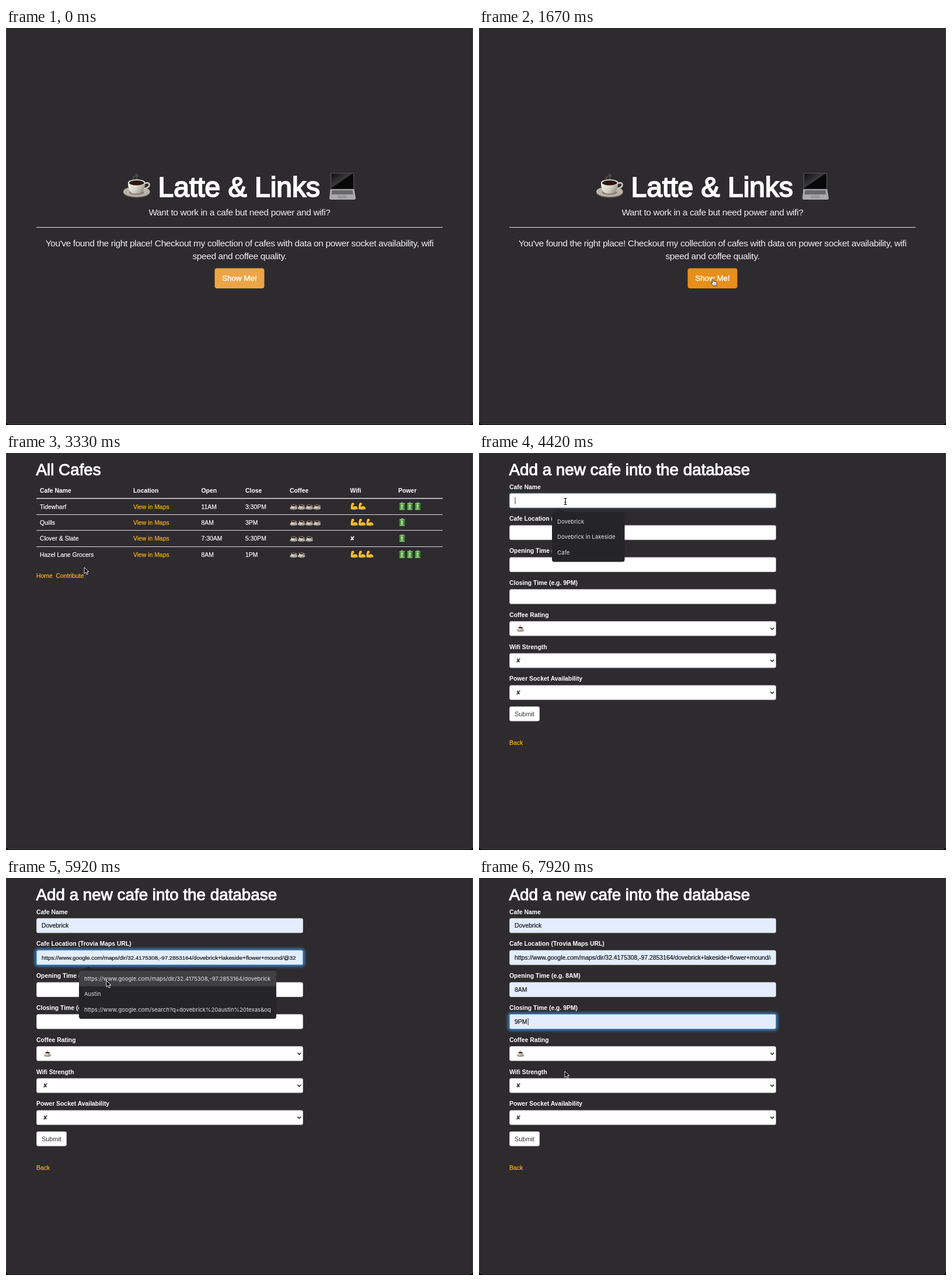
These frames come from a looping animation (800x680 px, 8000 ms). An HTML page:

```html
<!DOCTYPE html>
<html lang="en">
<head>
<meta charset="utf-8">
<title>Cafe finder</title>
<style>
  html, body { margin: 0; width: 100%; height: 100%; overflow: hidden; background: #000; }
  svg { display: block; }
  text { font: 10.4px "Liberation Sans", Arial, sans-serif; fill: #fff; stroke: #fff; stroke-width: .2px; white-space: pre; }
  .bold { font-weight: 700; stroke: none; }
  .title { font-size: 27.8px; stroke-width: 1px; }
  .hero { font-size: 48px; stroke-width: 2px; }
  .lead { font-size: 15.5px; letter-spacing: -.39px; fill: #f0f0f0; stroke: none; text-anchor: middle; }
  .button { font-size: 13.4px; stroke-width: .4px; text-anchor: middle; }
  .link { fill: #ffb50f; stroke: #ffb50f; }
  .value { fill: #111; stroke: #111; }
  .preview { fill: #111; stroke: #111; font-size: 9.85px; }
  .mark { font-family: "DejaVu Sans", sans-serif; stroke: none; }
  .dark { fill: #333; stroke: none; }
  .option { font: 9.6px Inter, Roboto, sans-serif; fill: #e2e2e2; stroke: none; }
  .box { fill: #fff; stroke: #ccc; }
</style>
</head>
<body>
<svg width="800" height="680" viewBox="0 0 800 680">
  <defs>
    <linearGradient id="china" x2="1" y2=".4">
      <stop stop-color="#efede7"/><stop offset=".6" stop-color="#d6d2c8"/><stop offset="1" stop-color="#9d988e"/>
    </linearGradient>
    <linearGradient id="screen" x2="1" y2="1">
      <stop stop-color="#0c0c0c"/><stop offset=".45" stop-color="#3a3a3c"/><stop offset=".5" stop-color="#080808"/>
    </linearGradient>
    <linearGradient id="cell" x2="1">
      <stop stop-color="#2c6b25"/><stop offset=".4" stop-color="#7fc765"/><stop offset="1" stop-color="#245c20"/>
    </linearGradient>
    <filter id="glow" x="-5%" y="-60%" width="110%" height="220%"><feGaussianBlur stdDeviation="2.2"/></filter>
    <symbol id="cup" viewBox="0 0 48 48">
      <path d="M20 13q-5-4 1-6t1-4M25 13q-3-4 2-8" fill="none" stroke="#55504f" stroke-width="2.4" opacity=".75"/>
      <ellipse cx="24" cy="35" rx="23" ry="9" fill="#7d786f"/>
      <ellipse cx="24" cy="33.5" rx="23" ry="8.700" fill="#bab5aa"/>
      <ellipse cx="24" cy="35" rx="13" ry="4.500" fill="#878177"/>
      <path d="M38 19q8-2 8 3t-11 7" fill="none" stroke="#cfcbc1" stroke-width="2.600"/>
      <path d="M9 18q0 17 10 19h9q10-2 11-19z" fill="url(#china)"/>
      <ellipse cx="24" cy="18" rx="15" ry="5.500" fill="#e9e6df"/>
      <ellipse cx="24" cy="18.500" rx="13" ry="4.300" fill="#2b170d"/>
    </symbol>
    <symbol id="arm" viewBox="0 0 26 26">
      <path d="M4 3q4-3 8 0l1 4-4 3 1 5q7-5 13 1 3 5 1 7-10 3-22 0-2-8 2-20z" fill="#fcc436"/>
      <path d="M8 9l-1 7 5 2M12 21q6 2 11-1" fill="none" stroke="#c88714" stroke-width="1.6"/>
    </symbol>
    <symbol id="battery" viewBox="0 0 26 26">
      <rect x="9" y="0" width="8" height="3" fill="#aaa"/>
      <rect x="3" y="2" width="20" height="24" rx="3" fill="url(#cell)"/>
      <path d="M4 4h18M4 24h18" stroke="#9fae9a" stroke-width="2"/>
      <path d="M13 8v7M9.500 11.500h7M10 19h6" stroke="#dff0d6" stroke-width="1.800"/>
    </symbol>
  </defs>
  <rect x=".5" y="-10" width="799" height="688.5" rx="5" fill="#2d2b2e" stroke="#444246"/>
  <g id="scenes"></g>
  <g id="live"></g>
</svg>
<script>
const LOOP = 8000, STEP = 1000 / 12;
const TABLE_AT = 2000, FORM_AT = 3740;

const text = (x, y, s, cls = '') => `<text x="${x}" y="${y}" class="${cls}">${s}</text>`;
const icon = (id, x, y, size) => `<use href="#${id}" x="${x}" y="${y}" width="${size}" height="${size}"/>`;
const rect = (x, y, w, h, attrs) => `<rect x="${x}" y="${y}" width="${w}" height="${h}" ${attrs}/>`;
const icons = (id, count, x, y) =>
  Array.from({ length: count }, (_, i) => icon(id, x + i * 13.35, y, 13.3)).join('');

function homeScene() {
  return icon('cup', 200, 247, 47.5) + text(260.5, 289, 'Latte &amp; Links', 'hero') +
    `<path d="M557 248h38q1.500 0 1.500 2v26h-41v-26q0-2 1.500-2z" fill="#48484a"/>
     <path d="M557.500 249.500h37.500v26H557z" fill="url(#screen)"/>
     <path d="M555.500 276h41l2.500 15q0 3-2 3h-41q-2 0-2-3z" fill="#a9a9ab"/>
     <path d="M558.500 278h35l1 7h-37z" fill="#68686b"/>
     <path d="M569 286.500h14l1 5h-16z" fill="#98989b"/>` +
    text(400, 321, 'Want to work in a cafe but need power and wifi?', 'lead') +
    rect(52, 341, 696, 1, 'fill="#e4e4e4"') +
    text(400, 373.5, "You've found the right place! Checkout my collection of cafes with data on power socket availability, wifi", 'lead') +
    text(400, 395.5, 'speed and coffee quality.', 'lead');
}

const columns = { 'Cafe Name': 58, Location: 218, Open: 334.5, Close: 410, Coffee: 486, Wifi: 589.5, Power: 672 };
const cafes = [
  ['Tidewharf', '11AM', '3:30PM', 4, 2, 3],
  ['Quills', '8AM', '3PM', 4, 3, 1],
  ['Clover &amp; Slate', '7:30AM', '5:30PM', 3, 0, 1],
  ['Hazel Lane Grocers', '8AM', '1PM', 2, 3, 3]
];

function tableScene() {
  const head = Object.entries(columns).map(([name, x]) => text(x, 67.5, name, 'bold')).join('');
  const rows = cafes.map(([name, open, close, coffee, wifi, power], i) => {
    const y = 95.5 + i * 27.4, top = y - 11;
    return text(58, y, name) + text(218, y, 'View in Maps', 'link') + text(334.5, y, open) + text(410, y, close) +
      icons('cup', coffee, 486, top + .5) +
      (wifi ? icons('arm', wifi, 590, top) : text(589, y, '✘', 'mark')) +
      icons('battery', power, 672, top) +
      (i ? rect(52, Math.round(y - 18), 696, 1, 'fill="#ddd"') : '');
  }).join('');
  return text(51.5, 38, 'All Cafes', 'title') + head + rect(52, 77, 696, 1.5, 'fill="#ddd"') + rows +
    text(52, 213.5, 'Home', 'link') + text(85.5, 213.5, 'Contribute', 'link');
}

const site = '//www.google.com';
const route = `https:${site}/maps/dir/32.4175308,-97.2853164/dovebrick+lakeside+flower+mound/@32`;
// Times: focus, option hovered, option chosen, focus lost.
const fields = [
  { label: 'Cafe Name', at: [4400, 4740, 4910, 5230], right: 249.5, options: ['Dovebrick', 'Dovebrick in Lakeside', 'Cafe'] },
  { label: 'Cafe Location (Trovia Maps URL)', at: [5230, 5480, 5990, 6320], right: 463,
    options: [route, 'Austin', `https:${site}/search?q=dovebrick%20austin%20texas&amp;oq=dove`] },
  { label: 'Opening Time (e.g. 8AM)', at: [6320, 6570, 6900, 7150], right: 179, options: ['8AM', '5AM'] },
  { label: 'Closing Time (e.g. 9PM)', at: [7150, 7400, 7580, 9000], right: 179, options: ['9PM', '3PM'] }
];
const selects = ['Coffee Rating', 'Wifi Strength', 'Power Socket Availability'];
const fieldTop = i => 69.3 + i * 54.8;

function formScene() {
  const labels = [...fields.map(f => f.label), ...selects];
  const body = labels.map((label, i) => {
    const y = fieldTop(i);
    let out = text(52, y - 7.7, label, 'bold') + rect(52.5, y, 456, 24.5, 'rx="2.5" class="box"');
    if (i >= fields.length) {
      out += `<path d="M499.300 ${y + 10.8}l3 3 3-3" fill="none" stroke="#333" stroke-width="1.600"/>` +
        (i === fields.length ? icon('cup', 64.5, y + 5.5, 13.3) : text(63, y + 15.8, '✘', 'mark dark'));
    }
    return out;
  }).join('');
  return text(51.5, 38, 'Add a new cafe into the database', 'title') + body +
    rect(52.5, 434.5, 51, 24.5, 'rx="2.5" class="box"') +
    `<text x="61" y="450.500" class="dark" style="font-size:10.900px">Submit</text>` + text(52, 500, 'Back', 'link');
}

function fieldState(f, i, t) {
  const [focus, hover, chosen, blur] = f.at, y = fieldTop(i);
  if (t < focus) return '';
  let out = '';
  const focused = t < blur;
  if (focused) {
    const strength = Math.min(1, (t - focus) / 150);
    out += `<g opacity="${strength}">` +
      rect(51, y - 1.5, 459, 27.5, 'rx="4" fill="none" stroke="#3f97ea" stroke-width="3" filter="url(#glow)"') +
      rect(52.5, y, 456, 24.5, 'rx="2.5" fill="#fff" stroke="#66afe9"') + '</g>';
  }
  if (t >= hover) {
    const cls = t < chosen ? 'preview' : 'value';
    out += rect(53, y + .5, 455, 23.5, 'rx="2" fill="#e3edfe"') +
      `<svg x="61" y="${y}" width="439" height="25">${text(0, 15.9, f.options[0], cls)}</svg>`;
  }
  const blinkFrom = t >= chosen ? chosen : focus;
  if (focused && (t - blinkFrom) % 1000 < 500) {
    const x = t >= chosen ? 61.5 + f.options[0].length * 7.4 : 61.5;
    out += rect(x, y + 6.5, 1, 12, 'fill="#333"');
  }
  return out;
}

function popup(f, i, t) {
  const [focus, hover, chosen] = f.at;
  if (t < focus || t >= chosen) return '';
  const top = fieldTop(i) + 31.5, width = f.right - 125, first = top + 16.5;
  const rows = f.options.map((s, n) => text(9, 20 + n * 26.7, s, 'option')).join('');
  return `<path d="M134 ${top + .5}l7-4.500 7 4.500z" fill="#252527"/>` +
    rect(125, top, width, f.options.length * 26.7 + 5.5, 'rx="4" fill="#252527"') +
    (t >= hover ? rect(125, first - 13.3, width, 26.7, 'rx="2" fill="#404043"') : '') +
    `<svg x="125" y="${top}" width="${width - 9}" height="90">${rows}</svg>`;
}

// Pointer stops: time, x, y.
const path = [
  [80, 470, 640], [830, 424, 500], [1330, 401, 432], [1670, 400, 430], [2080, 400, 430],
  [2750, 240, 290], [3330, 134, 196], [3560, 112, 208], [3760, 112, 208],
  [4330, 148, 83], [4500, 148, 83], [4760, 150, 114], [4920, 150, 116],
  [5200, 152, 138], [5290, 152, 138], [5520, 171, 172], [5920, 172, 176], [6010, 172, 176],
  [6270, 148, 190], [6380, 147, 191], [6600, 145, 222], [6750, 144, 215], [6910, 145, 224],
  [7120, 146, 246], [7220, 146, 247], [7420, 146, 278], [7590, 146, 281], [7900, 147, 331]
];

function pointerAt(t) {
  const n = path.findIndex(p => p[0] > t);
  if (n < 0) return path[path.length - 1].slice(1);
  const [t0, x0, y0] = path[n - 1], [t1, x1, y1] = path[n];
  const u = (t - t0) / (t1 - t0), k = u * u * (3 - 2 * u);
  return [x0 + (x1 - x0) * k, y0 + (y1 - y0) * k];
}

const shapes = {
  arrow: '<path d="M0 0v10.500l2.500-2.300 1.800 4 1.900-.800-1.800-3.900h3.400z" fill="#000" stroke="#fff" stroke-width=".900"/>',
  hand: '<path d="M0 1q0-1.500 1.200-1 .700.200.700 1v3l4 .800q1.600.500 1.400 2l-.700 5H1.500l-3.700-4.700q0-1.300 1.200-1L0 7z" fill="#fff" stroke="#222" stroke-width=".900"/><path d="M2.500 7.500v3M4.500 7.500v3" stroke="#222" stroke-width=".600"/>',
  beam: '<path d="M-2.500-5.500q2.500 0 2.500 1.500 0-1.500 2.500-1.500M0-4v8M-2.500 5.500q2.500 0 2.500-1.500 0 1.500 2.500 1.500M-1.500 1.500h3" fill="none" stroke="#111" stroke-width="1.200"/>'
};
const inside = (x, y, l, t, r, b) => x >= l && x <= r && y >= t && y <= b;

function pointerKind(scene, x, y, t) {
  if (scene === 0) return inside(x, y, 358, 412, 442, 446) ? 'hand' : 'arrow';
  if (scene === 1) return inside(x, y, 86, 203, 134, 216) ? 'hand' : 'arrow';
  const open = fields.findIndex(f => t >= f.at[0] && t < f.at[2]);
  if (open >= 0 && y > fieldTop(open) + 30) return 'arrow';
  return fields.some((_, i) => inside(x, y, 52, fieldTop(i), 509, fieldTop(i) + 25)) ? 'beam' : 'arrow';
}

const scenes = document.getElementById('scenes'), live = document.getElementById('live');
scenes.innerHTML = [homeScene(), tableScene(), formScene()].map(s => `<g>${s}</g>`).join('');

function draw(t) {
  const scene = t < TABLE_AT ? 0 : t < FORM_AT ? 1 : 2;
  [...scenes.children].forEach((g, i) => { g.style.display = i === scene ? '' : 'none'; });
  const shown = t >= path[0][0];
  const [x, y] = shown ? pointerAt(t) : [-50, -50];
  const kind = pointerKind(scene, x, y, t);
  let out = '';
  if (scene === 0) {
    out += rect(357.5, 411.5, 85, 34.5, `rx="4" fill="${kind === 'hand' ? '#e88f1b' : '#eda445'}"`) +
      text(400, 433, 'Show Me!', 'button');
  }
  if (scene === 2) {
    out += fields.map((f, i) => fieldState(f, i, t)).join('') + fields.map((f, i) => popup(f, i, t)).join('');
  }
  if (shown) out += `<g transform="translate(${x.toFixed(1)} ${y.toFixed(1)})">${shapes[kind]}</g>`;
  live.innerHTML = out;
}

let last = -1;
function tick() {
  const step = Math.floor((performance.now() % LOOP + 4) / STEP);
  if (step !== last) draw((last = step) * STEP);
  requestAnimationFrame(tick);
}
tick();
</script>
</body>
</html>
```
